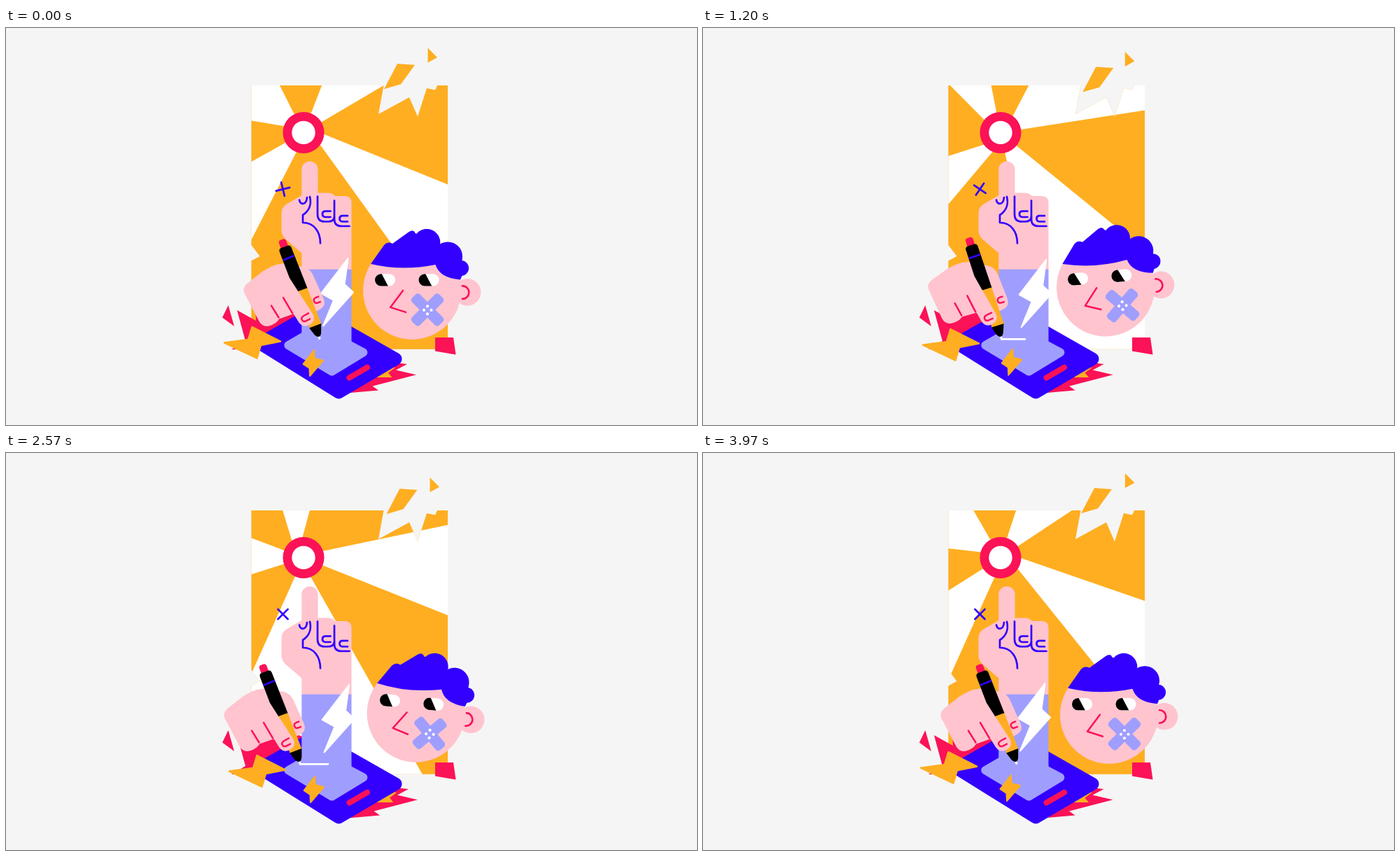
Write an HTML page with a canvas that moves like this. It is 987 px wide and 567 px high and loops after 4.01 s.

```html
<!DOCTYPE html>
<html lang="en">
<head>
<meta charset="utf-8">
<title>Press the button</title>
<style>
html, body { margin: 0; width: 100%; height: 100%; overflow: hidden; background: #f5f5f5; }
canvas { display: block; }
</style>
</head>
<body>
<canvas id="stage" width="987" height="567"></canvas>
<script>
const ctx = document.getElementById('stage').getContext('2d');
const BG = '#f5f5f5', YELLOW = '#ffae21', RED = '#fb1257', PINK = '#ffc4ce';
const BLUE = '#3300ff', LILAC = '#9f9eff', WHITE = '#fff', BLACK = '#000';
const LOOP = 4010, STEPS = 120, RAD = Math.PI / 180;

// ---------- drawing helpers ----------
function fill(d, color) {
  ctx.fillStyle = color;
  ctx.fill(new Path2D(d));
}
function line(d, color, width = 2.7, cap = 'round') {
  ctx.strokeStyle = color;
  ctx.lineWidth = width;
  ctx.lineCap = cap;
  ctx.lineJoin = 'round';
  ctx.stroke(new Path2D(d));
}
function softFill(d, color, width) {
  fill(d, color);
  line(d, color, width);
}
function disc(x, y, r, color) {
  ctx.fillStyle = color;
  ctx.beginPath();
  ctx.arc(x, y, r, 0, 2 * Math.PI);
  ctx.fill();
}
function pill(x, y, w, h, r, color) {
  ctx.fillStyle = color;
  ctx.beginPath();
  ctx.roundRect(x, y, w, h, r);
  ctx.fill();
}
function roundPoly(pts, r, color) {
  const last = pts[pts.length - 1];
  ctx.fillStyle = color;
  ctx.beginPath();
  ctx.moveTo((last[0] + pts[0][0]) / 2, (last[1] + pts[0][1]) / 2);
  pts.forEach((p, i) => {
    const q = pts[(i + 1) % pts.length];
    ctx.arcTo(p[0], p[1], q[0], q[1], r);
  });
  ctx.closePath();
  ctx.fill();
}
function group(draw, dx = 0, dy = 0) {
  ctx.save();
  ctx.translate(dx, dy);
  draw();
  ctx.restore();
}
function turn(x, y, deg) {
  ctx.translate(x, y);
  ctx.rotate(deg * RAD);
  ctx.translate(-x, -y);
}

// ---------- timing helpers ----------
function ramp(n, a, b) {
  const u = Math.min(1, Math.max(0, (n - a) / (b - a)));
  return (1 - Math.cos(Math.PI * u)) / 2;
}
// Smooth periodic curve through six keys
const KEYS = [0, 4, 11, 17, 25, 29], PERIOD = 30;
function sway(n, vals) {
  const c = KEYS.length, p = n % PERIOD;
  const t = i => KEYS[(i + c) % c] + PERIOD * Math.floor(i / c);
  const v = i => vals[(i + c) % c];
  const slope = i => (v(i + 1) - v(i - 1)) / (t(i + 1) - t(i - 1));
  let i = c - 1;
  while (KEYS[i] > p) i--;
  const h = t(i + 1) - t(i), u = (p - t(i)) / h, w = 1 - u;
  return v(i) * w * w * (1 + 2 * u) + v(i + 1) * u * u * (3 - 2 * u)
    + h * u * w * (slope(i) * w - slope(i + 1) * u);
}

// ---------- poster ----------
const CX = 425, CY = 149.4;
// Ray edges: [angle, distance of the edge from the hub]
const EDGES = [[22.1, -8.9], [54.2, -9.1], [117.2, -3.6], [150.8, 0],
               [189.5, 4.6], [243.2, 0], [291.2, 0], [329.5, 0]];

function poster(n) {
  ctx.save();
  ctx.clip(new Path2D('M350.4 82H539.5L532 123L576 99L588 126.500L601 86L613 88.500L616 82H631V458.800H350.400V332.500L362.500 326L350.400 310Z'));
  ctx.fillStyle = YELLOW;
  ctx.fillRect(340, 70, 300, 400);
  ctx.fillStyle = WHITE;
  for (let i = 0; i < 8; i += 2) {
    const [a, b] = [EDGES[i], EDGES[i + 1]].map(([deg, off]) => {
      const r = (deg + 3 * n) * RAD, c = Math.cos(r), s = Math.sin(r);
      const x = CX - off * s, y = CY + off * c;
      return [x, y, x + 700 * c, y + 700 * s];
    });
    ctx.beginPath();
    ctx.moveTo(a[0], a[1]);
    ctx.lineTo(a[2], a[3]);
    ctx.lineTo(b[2], b[3]);
    ctx.lineTo(b[0], b[1]);
    ctx.fill();
  }
  ctx.restore();

  group(() => fill('M559 51L584 52.700L564 80.300L540 87.200Z', YELLOW),
    sway(n, [0, 1.8, 2.9, 3.4, 2, 0]), sway(n, [0, 4, 3.6, 0, -4.6, -1]));
  group(() => fill('M602.500 28.500L616 42L602.500 49.500Z', YELLOW),
    sway(n, [0, 0, 1.2, 3, 1.6, 0.4]), sway(n, [0, 3.6, 9.5, 6.6, 3.5, 0.6]));
}

// ---------- phone ----------
function phone(n) {
  fill('M317.500 396L326 426L309 413.500Z', RED);
  fill('M613 442H639L642.500 466.500L613 461.500Z', RED);
  fill('M330 403L357 418L356 386L425 405V445L372 458L322 459L342 447Z', RED);
  group(() => {
    fill('M540 476L573 480L557 488.500L586 495.300L523.500 511.500L532 517.500L486 521.500L500 490Z', RED);
    fill('M520 499H551.500L546 492.500L556 485L530 480Z', YELLOW);
  }, sway(n, [0, 0, -1, 2, -1, -0.5]), 0);
  roundPoly([[345, 450], [440, 396], [574.5, 472.5], [475, 531]], 9, BLUE);
  roundPoly([[391.5, 453], [445, 422], [522.5, 463], [465.5, 497.5]], 6, LILAC);
  line('M490.500 499.500L516 484.700', RED, 8);
}

// ---------- pointing hand ----------
function fist(dy) {
  group(() => {
    fill('M422.300 345V321.500L398.500 301Q393.500 296 393.500 288V266Q393.500 256 400 252L422.300 239V202A11.600 11.600 0 0 1 445.500 202V235.500H460Q466 235.500 470 240H484Q493.500 240 493.500 250V345Z', PINK);
    line('M419 245.500C420 253 429 253.500 430 242', BLUE);
    line('M434 241C437 253 432 262 424 267V278C440 278 449 291 449 307.500', BLUE);
    line('M445 240.500V266Q445 276.500 455 276.500H460Q468 276.500 469 270', BLUE);
    line('M469 246.500V273Q469 283 479 283H490.500', BLUE);
    line('M463.500 261.700H455.500A4.200 4.200 0 0 0 455.500 270H463.500', BLUE);
    line('M488 268.200H480A4.200 4.200 0 0 0 480 276.500H488', BLUE);
  }, 0, dy);
  ctx.fillStyle = LILAC;
  ctx.fillRect(422.3, 344.7 + dy, 71.2, 105.300 - dy);
}

function armBolt(n) {
  ctx.save();
  if (n > 40 && n < 108) {
    ctx.beginPath();
    ctx.rect(422.3, 300, 71.6, 150);
    ctx.clip();
  }
  ctx.translate(sway(n, [0, 1.2, 2.6, 1.5, 1, 0]), sway(n, [0, 2, 1, 2, 1, 0]));
  softFill('M488.500 329L450 379L468 389L453 425.500L496 377.500L483.500 366Z', WHITE, 2);
  ctx.restore();
}

function button() {
  disc(CX, CY, 29.5, RED);
  disc(CX, CY, 16.7, WHITE);
}

function cross(n) {
  const u = Math.min(1, ((n + 1) % 30) / 9);
  ctx.save();
  turn(395.5, 230.2, 45 + 180 * Math.sin(u * Math.PI / 2));
  line('M385.500 230.200H405.500M395.500 220.200V240.200', BLUE);
  ctx.restore();
}

// ---------- writing hand ----------
function writer(n) {
  const lift = ramp(n, 6, 22), write = ramp(n, 24, 40), back = ramp(n, 82, 97);
  const x = 446.7 + 15.3 * lift - 43.3 * write + 28 * back;
  const y = 441.5 - 0.5 * lift + 0.5 * write;
  const tilt = -20.2 * (1 - lift + write);

  if (n >= 24 && back < 1) {
    const right = 461 - 41 * back;
    line(`M${Math.min(x + 0.5, right)} 444.300H${right}`, WHITE, 2.7, 'butt');
  }

  ctx.save();
  ctx.translate(x, y);
  ctx.rotate(tilt * RAD);
  ctx.translate(-462, -441);
  fill('M384 346Q383 338 392 334L412 327.500Q424 323 440 323L458 326L470 336Q484 341 485 356L487.500 391Q488 402 479 404L466 406L440 397.500L418 397Q412 402 402 401.500Q392 401 390 391Z', PINK);

  line('M462.500 438V444.500', WHITE, 3, 'butt');
  pill(455, 292, 11, 18, 4, RED);
  fill('M451.500 308Q451.500 303 456 303H465Q469.500 303 469.500 308L471 370H457L452 347Z', BLACK);
  line('M452 320.300L469.500 319.700', BLUE, 2.8, 'butt');
  fill('M457 369.500H471L472 425H454Z', YELLOW);
  fill('M453.800 424H472L467.500 436Q465.500 440.500 462.500 440.500Q459.500 440.500 457.500 436Z', BLACK);

  fill('M434 370L442.500 411Q445 421 455 420Q467 418 465.500 407L457 369.500Z', PINK);
  line('M414 375.500L418 395M434 370.500L438.500 396', RED, 2.5);
  line('M460 404L452.500 405Q447.500 406 448 409.500Q448.500 413.500 453 413L459 412.300', RED, 2.5);
  line('M481.500 386.500H477.500Q473.500 387 473.500 390.500Q473.500 394.500 477.500 394.500H481.500', RED, 2.5);
  ctx.restore();
}

// ---------- loose bolts ----------
function looseBolts(n) {
  group(() => softFill('M351.500 427L392 447.500L364 453L358.500 471.500L312 449.500L346 445Z', YELLOW, 2.5),
    sway(n, [0, 2, 2, 7, -2, -1]), sway(n, [0, 1.5, 7, 5, 2.6, 0.2]));
  group(() => softFill('M440 460L440.500 472L453 475L434 497L433.500 486L424.500 480Z', YELLOW, 2),
    sway(n, [0, 2.8, 0, 1, 0, 0]), sway(n, [0, -1.5, 0, 2, 0.7, 0]));
}

// ---------- head ----------
function eye(x, y, shut) {
  ctx.save();
  ctx.beginPath();
  ctx.roundRect(x - 14.5, y - 8.7, 29, 17.4, 8.7);
  ctx.clip();
  ctx.fillStyle = WHITE;
  ctx.fillRect(x - 16, y - 10, 32, 20);
  fill(`M${x - 16} ${y - 9}H${x - 5}L${x + 4.5} ${y + 9}H${x - 16}Z`, BLACK);
  if (shut > 0) pill(x - 14.5, y - 31, 29, 36.8 - 18 * (1 - shut), 8.7, PINK);
  ctx.restore();
}

function head(n) {
  const beat = n % 40;
  const bob = -3 + 7.6 * Math.cos((n - 7.5) * 9 * RAD);
  const tilt = -4.6 * ramp(n, 7, 20) + 12.1 * ramp(n, 35, 46)
    - 2.6 * ramp(n, 48, 57) - 4.9 * ramp(n, 83, 96);
  const shut = ramp(n, 41, 45) * (1 - ramp(n, 49, 53));

  ctx.save();
  ctx.translate(0, bob);
  turn(580, 440, tilt);

  const from = ramp(beat, 14, 23), to = ramp(beat, 26, 35);
  if (from > to) {
    ctx.strokeStyle = WHITE;
    ctx.lineWidth = 2.6;
    ctx.lineCap = 'round';
    ctx.beginPath();
    ctx.arc(580, 375, 79.5, (160 - 62 * from) * RAD, (160 - 62 * to) * RAD);
    ctx.stroke();
  }

  disc(659, 377.5, 19.3, PINK);
  disc(580, 375, 70, PINK);
  line('M652 368.500A9.200 9.200 0 0 1 652 387', RED);

  fill('M521 337L540 310Q545 304.500 552 308L575 291.500Q582 287 584.500 293L600 300L631 320L655 345L649 359.500Q619 357 613.500 338Q566 347.500 521 337Z', BLUE);
  disc(601, 306.5, 19.3, BLUE);
  disc(631, 326.5, 21, BLUE);
  disc(650, 343, 11, BLUE);

  eye(541.5, 360, shut);
  eye(604, 360, shut);
  line('M567 375L549 399L571 406', RED, 2.5);

  for (const deg of [45, -45]) {
    ctx.save();
    turn(602, 402.500, deg);
    pill(574.5, 394.5, 55, 16, 4.5, LILAC);
    ctx.restore();
  }
  for (const [dx, dy] of [[0, -5], [-5, 0.5], [5.5, 0.5], [0, 6]]) disc(602 + dx, 402.500 + dy, 2.1, WHITE);
  ctx.restore();
}

// ---------- main loop ----------
function press(n) {
  const b = n % 40;
  return -30 * ramp(b, 0, 14.5) * (1 - ramp(b, 14, 36));
}
function draw(n) {
  ctx.fillStyle = BG;
  ctx.fillRect(0, 0, 987, 567);
  poster(n);
  phone(n);
  fist(press(n));
  button();
  cross(n);
  armBolt(n);
  writer(n);
  looseBolts(n);
  head(n);
}
function tick() {
  const t = performance.now() % LOOP;
  // thirty steps a second, held on a 10 ms clock
  draw(Math.min(STEPS - 1, Math.floor(0.3 * Math.floor(t / 10) + 0.15)));
  requestAnimationFrame(tick);
}
tick();
</script>
</body>
</html>
```
